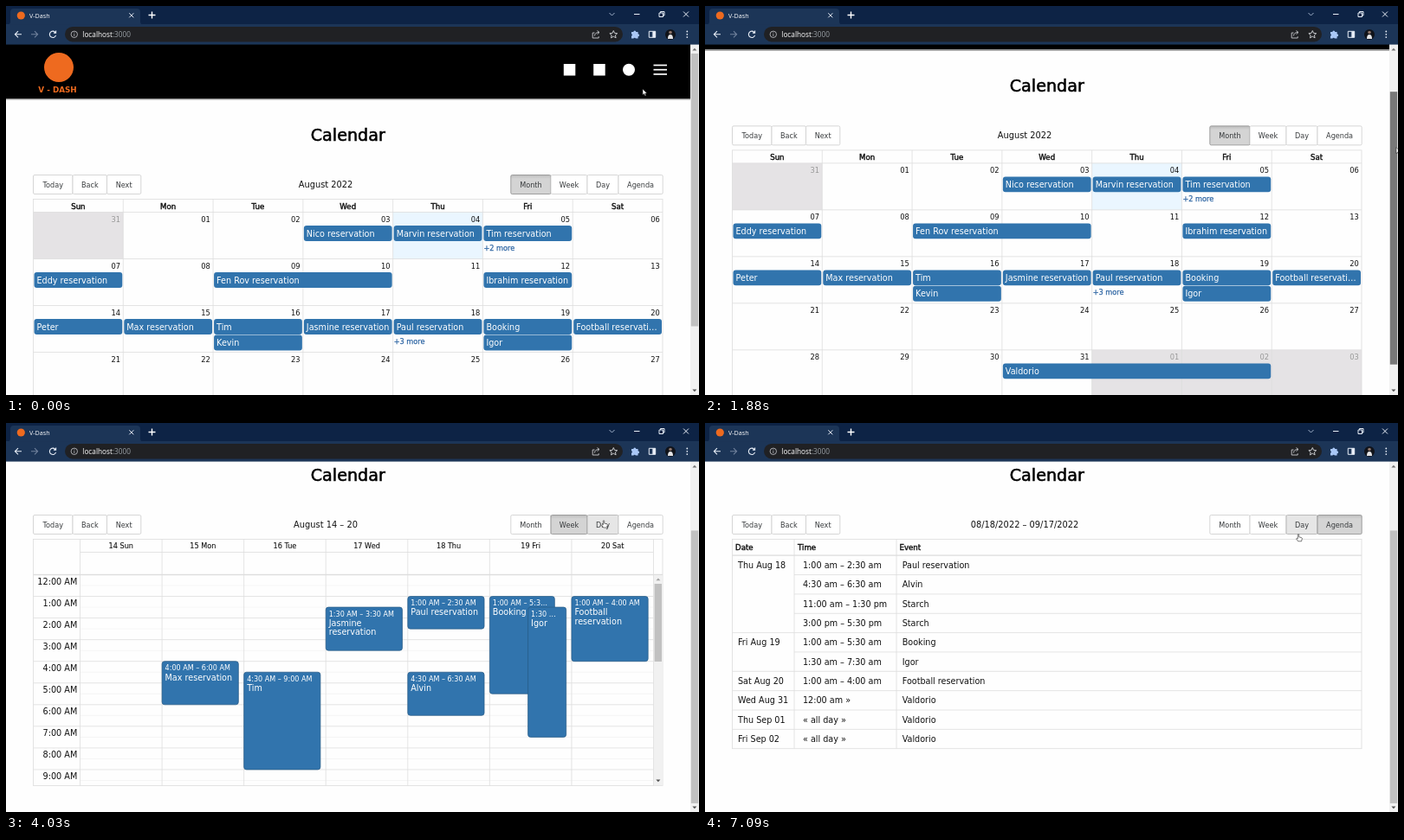
Write an HTML page that moves like this. It is 800 px wide and 450 px high and loops after 7.15 s.

```html
<!DOCTYPE html>
<html lang="en">
<head>
<meta charset="utf-8">
<title>Calendar</title>
<style>
  html, body { margin: 0; width: 100%; height: 100%; overflow: hidden; background: #fefefe; }
  svg { display: block; width: 800px; height: 450px; }
  text { font-family: "DejaVu Sans", sans-serif; white-space: pre; }
  .ui text { font-family: "Open Sans", "Noto Sans", sans-serif; }
</style>
</head>
<body>
<svg id="stage" viewBox="0 0 800 450"></svg>
<script>
const LOOP = 7150;
const BLUE = '#3174ad', GRID = '#dddddd', INK = '#111';
const TOP = 223.5, LEFT = 31.5, RIGHT = 758, BOTTOM = TOP + 285;
const HOUR = 25.05, GUTTER = 85.5, DAYS_END = 747.5;
const WEEKDAYS = ['Sun', 'Mon', 'Tue', 'Wed', 'Thu', 'Fri', 'Sat'];

// SVG helpers
const rect = (x, y, w, h, fill, more = '') =>
  `<rect x="${x}" y="${y}" width="${w}" height="${h}" fill="${fill}" ${more}/>`;
const line = (x1, y1, x2, y2, color = GRID, w = 0.8) =>
  `<path d="M${x1} ${y1}L${x2} ${y2}" stroke="${color}" stroke-width="${w}"/>`;
const icon = (d, color = '#e8eef7', w = 1) =>
  `<path d="${d}" fill="none" stroke="${color}" stroke-width="${w}"/>`;
const shape = (d, fill) => `<path d="${d}" fill="${fill}"/>`;
const dot = (x, y, r, fill) => `<circle cx="${x}" cy="${y}" r="${r}" fill="${fill}"/>`;
const text = (x, y, s, size = 9.65, { fill = INK, at = 'start', bold = 0 } = {}) =>
  `<text x="${x}" y="${y}" font-size="${size}" fill="${fill}" text-anchor="${at}"` +
  (bold ? ` stroke="${fill}" stroke-width="${bold}"` : '') + `>${s}</text>`;
const frame = (bottom) =>
  rect(LEFT, TOP, RIGHT - LEFT, bottom - TOP, 'none', `stroke="${GRID}" stroke-width=".8"`);

function monthView() {
  const colW = (RIGHT - LEFT) / 7, rowH = 54, y0 = TOP + 15;
  const colX = c => LEFT + c * colW, rowY = r => y0 + r * rowH;
  let out = rect(colX(0), y0, colW, rowH, '#e5e3e5')
    + rect(colX(4), y0, colW, rowH, '#eaf6ff')
    + rect(colX(4), rowY(4), colW * 3, rowH, '#e5e3e5');
  for (let c = 0; c < 7; c++) {
    out += text(colX(c + .5), TOP + 11, WEEKDAYS[c], 8.65, { at: 'middle', bold: .4 });
    if (c) out += line(colX(c), TOP, colX(c), rowY(5));
  }
  for (let r = 0; r < 5; r++) {
    out += line(LEFT, rowY(r), RIGHT, rowY(r));
    for (let c = 0; c < 7; c++) {
      const n = r * 7 + c, off = n === 0 || n > 31;
      const day = n === 0 ? 31 : n > 31 ? n - 31 : n;
      out += text(colX(c + 1) - 3.2, rowY(r) + 11.2, String(day).padStart(2, '0'), 8.3,
        { at: 'end', fill: off ? '#999' : INK });
    }
  }
  out += frame(rowY(5));
  // row, column, span, slot, title
  const events = [
    [0, 3, 1, 0, 'Nico reservation'], [0, 4, 1, 0, 'Marvin reservation'], [0, 5, 1, 0, 'Tim reservation'],
    [1, 0, 1, 0, 'Eddy reservation'], [1, 2, 2, 0, 'Fen Rov reservation'], [1, 5, 1, 0, 'Ibrahim reservation'],
    [2, 0, 1, 0, 'Peter'], [2, 1, 1, 0, 'Max reservation'], [2, 2, 1, 0, 'Tim'], [2, 2, 1, 1, 'Kevin'],
    [2, 3, 1, 0, 'Jasmine reservation'], [2, 4, 1, 0, 'Paul reservation'], [2, 5, 1, 0, 'Booking'],
    [2, 5, 1, 1, 'Igor'], [2, 6, 1, 0, 'Football reservati…'], [4, 3, 3, 0, 'Valdorio']
  ];
  for (const [r, c, span, slot, title] of events) {
    const x = colX(c) + 1, y = rowY(r) + 15.6 + slot * 18.4;
    out += rect(x, y, colW * span - 2, 17.9, BLUE, 'rx="3"') + text(x + 3, y + 12.5, title, 9.65, { fill: '#fff' });
  }
  for (const [r, c, n] of [[0, 5, 2], [2, 4, 3]])
    out += text(colX(c) + 1, rowY(r) + 44, `+${n} more`, 8.2, { fill: '#2d65a3', bold: .25 });
  return out;
}

function timeEvent(x, w, body, from, to, label, lines) {
  const y = body + from * HOUR;
  return rect(x, y, w, (to - from) * HOUR, BLUE, 'rx="3" stroke="#265985" stroke-width=".7"')
    + text(x + 3.5, y + 10.6, label, 8.05, { fill: '#fff' })
    + lines.map((s, i) => text(x + 3.5, y + 21.8 + i * 10.2, s, 9.65, { fill: '#fff' })).join('');
}

function timeGrid(body, cols) {
  const colW = (DAYS_END - GUTTER) / cols;
  let out = '';
  for (let h = 0; h < 10; h++) {
    const y = body + h * HOUR;
    if (h) out += line(LEFT, y, DAYS_END, y);
    if (y + HOUR / 2 < BOTTOM) out += line(GUTTER, y + HOUR / 2, DAYS_END, y + HOUR / 2, '#f3f3f3');
    out += text(82.3, y + 11.2, `${h || 12}:00 AM`, 9.7, { at: 'end' });
  }
  if (body + 10 * HOUR < BOTTOM - 12) {
    const y = body + 10 * HOUR;
    out += line(LEFT, y, DAYS_END, y) + text(82.3, y + 11.2, '10:00 AM', 9.7, { at: 'end' });
  }
  for (let c = 0; c <= cols; c++) out += line(GUTTER + c * colW, TOP, GUTTER + c * colW, BOTTOM);
  out += line(LEFT, body, RIGHT, body, GRID, 1.3) + frame(BOTTOM);
  out += rect(748, body + .7, 9.6, BOTTOM - body - 1, '#f1f1f1')
    + rect(748.6, body + 10.5, 8.4, 90, '#c1c1c1')
    + shape(`M750.4 ${body + 6.7}h5l-2.5-2.8z`, '#a3a3a3')
    + shape(`M750.4 ${BOTTOM - 7}h5l-2.5 2.8z`, '#505050');
  return out;
}

function weekView() {
  const body = TOP + 41, colW = (DAYS_END - GUTTER) / 7, full = colW - 6.3;
  let out = timeGrid(body, 7) + line(GUTTER, TOP + 15, DAYS_END, TOP + 15);
  WEEKDAYS.forEach((d, c) => {
    out += text(GUTTER + (c + .5) * colW, TOP + 10.8, `${14 + c} ${d}`, 8.15, { at: 'middle', bold: .1 });
  });
  // column, offset, width, start, end, label, title lines
  const events = [
    [1, 0, full, 4, 6, '4:00 AM – 6:00 AM', ['Max reservation']],
    [2, 0, full, 4.5, 9, '4:30 AM – 9:00 AM', ['Tim']],
    [3, 0, full, 1.5, 3.5, '1:30 AM – 3:30 AM', ['Jasmine', 'reservation']],
    [4, 0, full, 1, 2.5, '1:00 AM – 2:30 AM', ['Paul reservation']],
    [4, 0, full, 4.5, 6.5, '4:30 AM – 6:30 AM', ['Alvin']],
    [5, 0, 75, 1, 5.5, '1:00 AM – 5:3…', ['Booking']],
    [5, 44.2, 44.1, 1.5, 7.5, '1:30 …', ['Igor']],
    [6, 0, full, 1, 4, '1:00 AM – 4:00 AM', ['Football', 'reservation']]
  ];
  for (const [c, dx, w, ...rest] of events) {
    const [from, to, label, lines] = rest;
    out += timeEvent(GUTTER + c * colW + dx, w, body, from, to, label, lines);
  }
  return out;
}

function dayView() {
  const body = TOP + 26, w = DAYS_END - GUTTER - 6.3;
  return timeGrid(body, 1)
    + timeEvent(GUTTER, w, body, 1, 2.5, '1:00 AM – 2:30 AM', ['Paul reservation'])
    + timeEvent(GUTTER, w, body, 4.5, 6.5, '4:30 AM – 6:30 AM', ['Alvin']);
}

function agendaView() {
  const rows = [
    ['Thu Aug 18', '1:00 am – 2:30 am', 'Paul reservation'], ['', '4:30 am – 6:30 am', 'Alvin'],
    ['', '11:00 am – 1:30 pm', 'Starch'], ['', '3:00 pm – 5:30 pm', 'Starch'],
    ['Fri Aug 19', '1:00 am – 5:30 am', 'Booking'], ['', '1:30 am – 7:30 am', 'Igor'],
    ['Sat Aug 20', '1:00 am – 4:00 am', 'Football reservation'], ['Wed Aug 31', '12:00 am »', 'Valdorio'],
    ['Thu Sep 01', '« all day »', 'Valdorio'], ['Fri Sep 02', '« all day »', 'Valdorio']
  ];
  const rowH = 22.35, y0 = TOP + 18.7, end = y0 + rows.length * rowH;
  let out = frame(end) + line(103, TOP, 103, end) + line(221, TOP, 221, end);
  [[35, 'Date'], [107, 'Time'], [224.5, 'Event']].forEach(([x, s]) => {
    out += text(x, TOP + 12.5, s, 8.65, { bold: .4 });
  });
  rows.forEach(([date, time, title], i) => {
    const y = y0 + i * rowH;
    out += line(date ? LEFT : 103, y, RIGHT, y, GRID, i ? .8 : 1.3);
    out += text(38, y + 14.6, date) + text(113, y + 14.6, time) + text(227.7, y + 14.6, title);
  });
  return out;
}

const views = {
  Month: [monthView, 'August 2022'],
  Week: [weekView, 'August 14 – 20'],
  Day: [dayView, 'Thursday Aug 18'],
  Agenda: [agendaView, '08/18/2022 – 09/17/2022']
};
// name, left, right
const buttons = [
  ['Today', 31.5, 77], ['Back', 77, 116.5], ['Next', 116.5, 155.8],
  ['Month', 582.8, 629], ['Week', 629, 671], ['Day', 671, 707], ['Agenda', 707, 758.2]
];
const BTN_Y = 195.5, BTN_H = 22;

function navbar() {
  const white = '#fff';
  return rect(0, 40, 790, 67, '#000') + rect(0, 107, 790, 1.4, '#8f8f8f')
    + dot(61, 71, 17, '#ee6a1f')
    + `<text x="59.5" y="100" font-size="8.8" font-weight="bold" text-anchor="middle" fill="#ee6a1f">V - DASH</text>`
    + rect(643.8, 67, 13.5, 13.5, white) + rect(678.2, 67, 13.5, 13.5, white) + dot(719, 73.8, 7, white)
    + [68.5, 73.7, 78.9].map(y => line(747.5, y, 763, y, white, 1.7)).join('');
}

function browserBar() {
  const pale = '#e8eef7';
  return rect(0, 0, 800, 22, '#0d2345') + rect(0, 21, 800, 23.6, '#1c3557')
    + shape('M2 21.5q3 0 3-4V7q0-4 4-4h142q4 0 4 4v10.500q0 4 3 4z', '#1c3557')
    + dot(17.3, 11, 4.6, '#ee6a1f') + text(27, 13.6, 'V-Dash', 7.2, { fill: '#fff' })
    + icon('M142.300 8.300l5 5m0-5l-5 5') + icon('M164.500 10.500h8m-4-4v8', '#fff', 1.4)
    + icon('M696.500 8l3 3 3-3', '#9fb0c9') + icon('M725 9.500h6.500')
    + icon('M754 8h4.500v4.500h-4.500zM755.500 8v-1.500h4.500v4.500h-1.500') + icon('M782 6.500l6 6m0-6l-6 6')
    + icon('M18 32.800h-7.500m3.500-3.600l-3.600 3.600 3.600 3.600', pale, 1.1)
    + icon('M29 32.800h7.500m-3.500-3.600l3.600 3.600-3.600 3.600', '#71829d', 1.1)
    + icon('M56.800 30.300a3.700 3.700 0 1 0 .8 3.600M57.600 28.500v2.600h-2.600', pale, 1.1)
    + rect(68, 24, 644, 17.4, '#202124', 'rx="8.7"')
    + icon('M82.500 32.800a3.700 3.700 0 1 1-7.400 0a3.700 3.700 0 1 1 7.400 0M78.800 32.300v2.500M78.800 30.500v.9', '#c9cbd0', .8)
    + text(88.3, 35.8, 'localhost<tspan fill="#9aa0a6">:3000</tspan>', 8.25, { fill: '#fff' })
    + icon('M679.500 31h-2.300v6h7v-1.800M679.500 34.500q.3-4 5-4M682.500 28.500l2.500 2-2.500 2.200', '#c9cbd0', .9)
    + icon('M701.300 28.500l1.300 2.900 3.100.3-2.300 2.100.7 3.100-2.800-1.700-2.800 1.700.7-3.100-2.300-2.100 3.100-.3z', '#d6d8dc', .9)
    + shape('M722 30h2.300a1.500 1.500 0 0 1 3 0h2.300v2.300a1.500 1.500 0 0 1 0 3v2.200h-2.700a1.300 1.300 0 0 0-2.400 0h-2.500v-2.700a1.300 1.300 0 0 0 0-2.500z', '#a9c7f5')
    + icon('M742.300 29.300h7.400v7h-7.400z') + rect(746.3, 29.3, 3.4, 7, pale)
    + dot(767, 33, 6, '#10131a') + dot(767, 30.5, 1.8, '#8b7268')
    + shape('M764 38q0-5 3-5t3 5z', '#e4e4e6')
    + [29.500, 32.800, 36.1].map(y => dot(786.3, y, .9, pale)).join('');
}

const calendar = Object.entries(views).map(([name, [draw, title]]) =>
  `<g id="view${name}">${text(369, 209.8, title, 9.85, { at: 'middle' })}${draw()}</g>`).join('');
const toolbar = buttons.map(([name, x1, x2]) =>
  `<g id="btn${name}">` + rect(x1, BTN_Y, x2 - x1, BTN_H, '#fff', 'rx="1.5" stroke-width=".8"')
  + text((x1 + x2) / 2, BTN_Y + 14, name, 8.15, { at: 'middle', fill: '#373a3c' }) + '</g>').join('');

const stage = document.getElementById('stage');
stage.innerHTML = `
  <defs><linearGradient id="pressed" x2="0" y2="1">
    <stop stop-color="#bdbdbd"/><stop offset=".2" stop-color="#d4d4d4"/>
  </linearGradient></defs>
  ${rect(0, 0, 800, 450, '#fefefe')}
  <g id="page">${navbar()}
    ${text(394.8, 155.6, 'Calendar', 19.15, { at: 'middle', fill: '#000', bold: .55 })}
    ${calendar}${toolbar}
  </g>
  ${rect(790, 44, 10, 406, '#f1f1f1')}
  <rect id="thumb" x="790.8" width="8.400" height="315.500"/>
  ${shape('M792.400 51.500h5l-2.500-2.800z', '#707070')}${shape('M792.400 443.500h5l-2.500 2.800z', '#505050')}
  <g class="ui">${browserBar()}</g>
  <g id="cursor" stroke="#222" stroke-width=".6" fill="#fff">
    <path id="arrow" d="M0 0v7l1.600-1.500 1.100 2.500 1.200-.5-1.100-2.500h2.200z"/>
    <path id="hand" d="M-.7.600q.7-1.200 1.400 0v3l3 .700q.8.300.6 1.200l-.7 3h-4l-2-3q.3-1 1.700 0z"/>
  </g>`;

const $ = id => document.getElementById(id);
const scrollKeys = [[1200, 0], [1450, 19], [1520, 22.5], [1880, 56.5], [2090, 86], [2160, 89]];
const cursorKeys = [
  [60, 735, 96], [650, 797, 120], [1200, 797, 120], [1520, 796.8, 138.5], [1880, 798, 163.5],
  [2090, 798, 187], [2160, 798, 189.5], [2260, 798, 189.5], [2900, 650, 113], [3480, 650, 113],
  [3900, 690, 112.5], [4900, 690, 112.5], [5330, 726.5, 112.5], [6440, 726.5, 112.5], [7060, 685, 128.300]
];
const viewKeys = [[0, 'Month'], [3150, 'Week'], [4240, 'Day'], [5500, 'Agenda']];

const smooth = u => u * u * (3 - 2 * u);
function sample(keys, t, ease = u => u) {
  if (t <= keys[0][0]) return keys[0].slice(1);
  for (let i = 1; i < keys.length; i++) {
    const [a, b] = [keys[i - 1], keys[i]];
    if (t < b[0]) {
      const u = ease((t - a[0]) / (b[0] - a[0]));
      return a.slice(1).map((v, k) => v + (b[k + 1] - v) * u);
    }
  }
  return keys[keys.length - 1].slice(1);
}

function render(t) {
  const [scroll] = sample(scrollKeys, t);
  const dragging = t > 1080 && t < 2260;
  const [x, y] = sample(cursorKeys, t, dragging ? undefined : smooth);
  const view = viewKeys.filter(k => k[0] <= t).pop()[1];

  $('page').setAttribute('transform', `translate(0 ${-scroll})`);
  for (const name in views) $('view' + name).style.display = name === view ? '' : 'none';

  let hovered = false;
  const top = BTN_Y - scroll;
  for (const [name, x1, x2] of buttons) {
    const over = x >= x1 && x < x2 && y >= top && y < top + BTN_H;
    const active = name === view;
    const box = $('btn' + name).firstChild;
    box.setAttribute('fill', active ? 'url(#pressed)' : over ? '#e6e6e6' : '#fff');
    box.setAttribute('stroke', active ? '#8c8c8c' : over ? '#adadad' : '#cccccc');
    hovered = hovered || over;
  }

  const thumb = $('thumb');
  thumb.setAttribute('y', 55 + scroll * .78);
  thumb.setAttribute('fill', dragging ? '#787878' : x >= 790 ? '#a8a8a8' : '#c1c1c1');

  $('cursor').setAttribute('transform', `translate(${x} ${y})`);
  $('arrow').style.display = hovered ? 'none' : '';
  $('hand').style.display = hovered ? '' : 'none';
}

const start = performance.now();
function tick() {
  render((performance.now() - start) % LOOP);
  requestAnimationFrame(tick);
}
tick();
</script>
</body>
</html>
```
